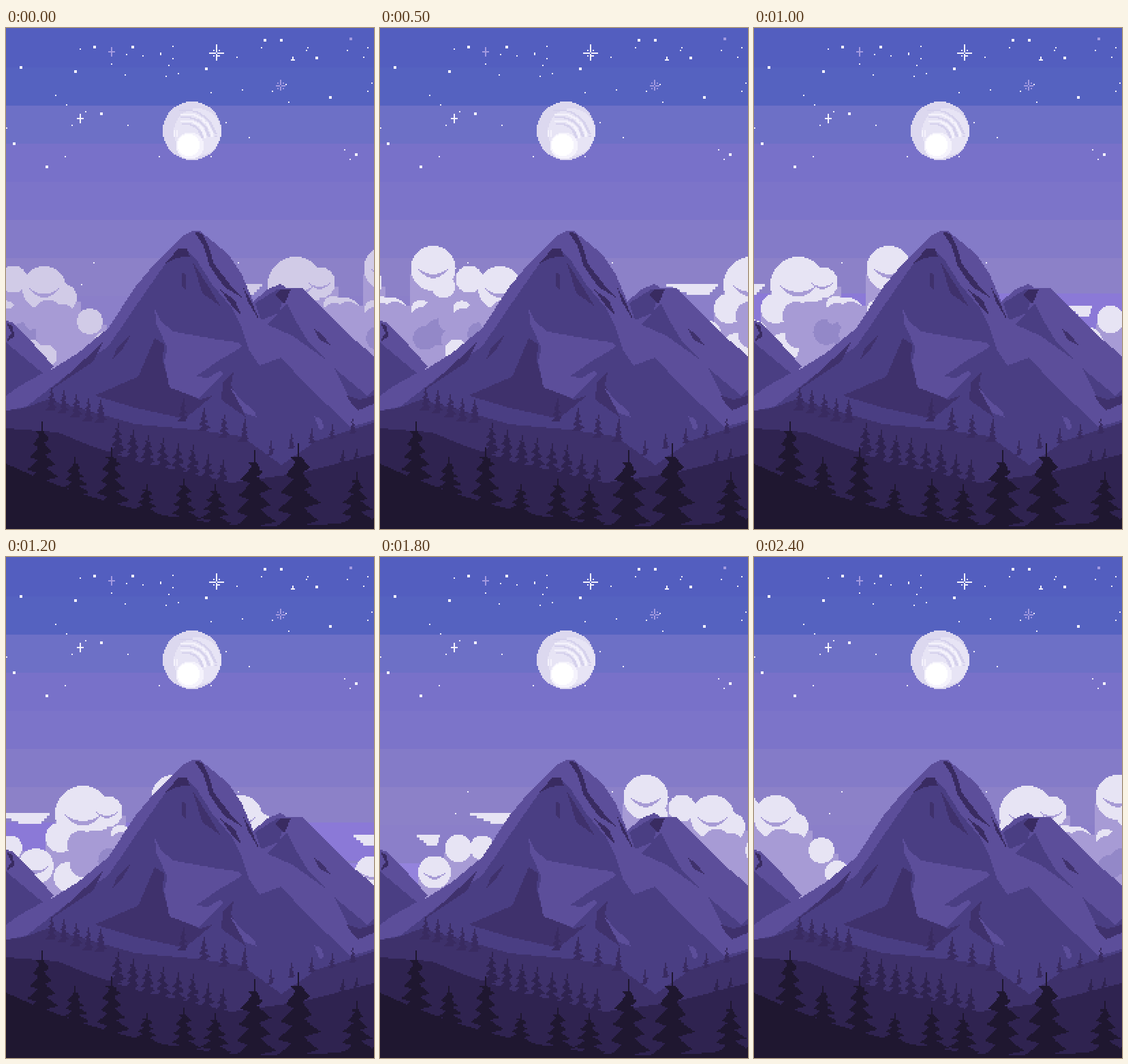
An HTML page with a canvas for the animation above (2.5 s loop, 540x736 px).

```html
<!DOCTYPE html>
<html lang="en">
<head>
<meta charset="utf-8">
<title>Night mountains</title>
<style>
html, body { margin: 0; width: 100%; height: 100%; overflow: hidden; background: #1f1730; }
canvas { display: block; width: 540px; height: 736px; image-rendering: pixelated; }
</style>
</head>
<body>
<canvas id="stage" width="270" height="368"></canvas>
<script>
// Coordinates are stage pixels; one art pixel covers 2 x 2 of them.
const W = 270, H = 368, STEP = 100, STEPS = 25, SPEED = 24, SPAN = 600;
const stage = document.getElementById('stage').getContext('2d');
let ctx = stage;

const rand = n => { const v = Math.sin(n * 12.9898) * 43758.5453; return v - Math.floor(v); };
const parse = text => text.trim().split(/\s+/).map(p => p.split(',').map(Number));
const each = (text, fn) => parse(text).forEach(p => fn(...p));
const loop = (n, fn) => { for (let i = 0; i < n; i++) fn(i); };

function layer(paint) {
  const canvas = document.createElement('canvas');
  canvas.width = W;
  canvas.height = H;
  ctx = canvas.getContext('2d');
  paint();
  ctx = stage;
  return canvas;
}

function rect(color, x, y, w, h) {
  ctx.fillStyle = color;
  ctx.fillRect(Math.floor(x / 2), Math.floor(y / 2), Math.max(1, Math.round(w / 2)), Math.max(1, Math.round(h / 2)));
}

// Hard-edged scanline fill
function fill(color, points) {
  const pts = points.map(([x, y]) => [x / 2, y / 2]);
  const ys = pts.map(p => p[1]);
  ctx.fillStyle = color;
  for (let y = Math.floor(Math.min(...ys)); y < Math.max(...ys); y++) {
    const mid = y + 0.5, cuts = [];
    pts.forEach(([x1, y1], i) => {
      const [x2, y2] = pts[(i + 1) % pts.length];
      if ((y1 <= mid) !== (y2 <= mid)) cuts.push(x1 + (mid - y1) / (y2 - y1) * (x2 - x1));
    });
    cuts.sort((a, b) => a - b);
    for (let i = 0; i + 1 < cuts.length; i += 2) {
      const a = Math.round(cuts[i]);
      ctx.fillRect(a, y, Math.round(cuts[i + 1]) - a, 1);
    }
  }
}

const poly = (color, text) => fill(color, parse(text));
const ridge = (color, text) => poly(color, text + ' 540,736 0,736');

function disk(color, x, y, r) {
  const ring = [];
  loop(36, i => ring.push([x + r * Math.cos(i * Math.PI / 18), y + r * Math.sin(i * Math.PI / 18)]));
  fill(color, ring);
}

// ---- Sky ----
const STAR = '#f4f2fd', LILAC = '#a39ae0';

function cross(color, x, y, r, below = r) {
  rect(color, x - r, y, r * 2 + 2, 2);
  rect(color, x, y - r - 2, 2, r + below + 4);
}

function sparkle(color, x, y, r) {
  cross(color, x, y, r);
  loop(4, i => rect(color, x + (i % 2 ? 4 : -4), y + (i < 2 ? 4 : -4), 2, 2));
  rect('#5662c0', x, y, 2, 2);
}

function moon(x, y, r) {
  disk('#dcd8ef', x, y, r);
  disk('#e7e4f5', x + 8, y + 2, r - 8);
  // Curved streaks around the bright basin
  loop(5, i => loop(30, j => {
    const a = -1.75 + j * 0.055, d = 24 + i * 5;
    rect(i % 2 ? '#f5f3fc' : '#d5d1ec', x - 10 + d * Math.cos(a), y + 14 + d * Math.sin(a), 4, 2);
  }));
  loop(2, i => rect('#f5f3fc', x - 27 + i * 4, y, 2, 10));
  disk('#f5f3fc', x - 3, y + 22, 20);
  disk('#ffffff', x - 5, y + 21, 16);
}

const sky = layer(() => {
  const bands = ['#535ebf', '#5562c0', '#6d70c6', '#7871c9', '#7c74c9', '#847bc8', '#8c81c8', '#8b7fc9', '#9483dd'];
  bands.forEach((c, i) => rect(c, 0, i * 56 + (i ? 2 : 0), 540, 736));
  loop(42, i => rect('#f0eefb', rand(i + 3) * 540, 26 + 180 * rand(i + 71) ** 1.4, 2, 2));
  each('22,58 102,64 130,28 186,28 294,60 380,18 404,18 456,44 476,102 140,126 60,204 12,170 514,186',
    (x, y) => rect(STAR, x - 2, y - 2, 4, 4));
  each('129,345 341,345 111,376', (x, y) => rect(STAR, x, y, 2, 2));
  rect(LILAC, 504, 14, 4, 4);
  cross(LILAC, 154, 34, 4, 6);
  cross(STAR, 108, 132, 4, 6);
  cross(STAR, 420, 46, 2, 0);
  sparkle(STAR, 308, 36, 10);
  sparkle(LILAC, 402, 84, 6);
  moon(273, 151, 43);
});

// ---- Clouds ----
const MID = '#a79bd5', DEEP = '#9388c8';
const BILLOWS = parse(`248,463,24 283,428,20 318,427,18 356,454,26 392,412,22 404,470,22 425,377,41 460,374,23
  497,420,24 558,353,33 573,380,17 611,369,20 656,382,32 684,396,20 723,431,19 746,464,18`);

function fold(x, y, r) {
  const top = [], low = [];
  loop(13, i => {
    const t = i / 6 - 1, bend = 1 - t * t;
    top.push([x + t * r, y + bend * r * 0.38]);
    low.unshift([x + t * r, y + bend * r * 0.62]);
  });
  fill(MID, [...top, ...low]);
}

function clouds(dx, light) {
  BILLOWS.forEach(([x, y, r]) => rect(MID, x - r + dx, y + r * 0.3, r * 2 + 6, 520 - y));
  loop(4, i => rect(light, 300 + i * 10 + dx, 376 + i * 4, 76 - i * 14, 4));
  loop(4, i => rect(light, 222 + i * 5 + dx, 408 + i * 4, 34 - i * 6, 4));
  BILLOWS.forEach(([x, y, r]) => disk(light, x + dx, y, r));
  // Shaded folds below the bright crowns
  loop(14, i => {
    const x = 420 + i * 20 + dx, y = 416 + 14 * rand(i + 5), r = 15 + 9 * rand(i + 40);
    if (i % 3 === 0) disk(light, x, y - 14, r * 0.8);
    disk(MID, x + 2, y, r);
    disk(i % 4 > 1 ? DEEP : MID, x + 6, y + 28, r);
  });
  loop(4, i => disk(light, 592 + i * 22 + dx, 474 + 8 * (i % 2), 17));
  BILLOWS.filter(b => b[2] > 22).forEach(([x, y, r]) => fold(x + dx, y, r * 0.7));
}

// ---- Land ----
const LIT = '#5c4e9a', SLOPE = '#4a3e83', SHADE = '#3f316c', CLEFT = '#392b61', FOOT = '#3e316b', WOOD = '#2f2350', FRONT = '#1f1730';

function peaks() {
  // Left hill
  poly(LIT, '0,430 12,434 32,455 70,497 56,512 0,550');
  poly(SLOPE, '0,462 24,482 54,507 20,526 0,540');
  poly(CLEFT, '0,433 10,438 12,454 0,461 8,448');

  // Right peak
  poly(LIT, '350,412 384,384 402,376 412,382 434,381 462,410 500,448 540,482 540,600 380,600');
  poly(SLOPE, '366,404 398,384 412,386 400,418 374,430');
  poly(CLEFT, '394,392 404,384 418,384 408,406');
  poly(SLOPE, '412,404 424,428 444,462 476,492 420,452 384,436');
  poly(SHADE, '452,442 464,450 476,466 460,458');
  poly(SLOPE, '482,500 530,540 540,530 540,560 515,566');
  poly(SHADE, '500,540 518,546 540,540 540,556 514,564');

  // Main peak
  poly(LIT, `0,540 20,536 60,506 105,478 150,441 190,380 220,344 262,304 274,298 284,298 326,332 346,362 374,428
    420,468 480,525 516,562 540,552 540,640 0,640`);
  poly(SLOPE, `262,324 278,338 302,376 332,412 346,440 357,474 372,496 404,484 440,524 506,586 540,576 540,660 0,660
    0,562 30,556 92,508 150,468 184,418 224,360 240,338`);
  poly(CLEFT, '276,299 288,302 298,322 305,346 328,376 346,396 320,380 299,350 290,320');
  poly(CLEFT, '234,346 252,325 266,325 269,335 250,338');
  poly(SHADE, '258,360 264,362 264,384 257,378');
  poly(SHADE, '274,344 296,378 314,408 288,390');
  poly(CLEFT, '314,384 336,400 346,424 334,412');
  poly(CLEFT, '346,376 362,406 372,430 356,404');
  poly(SHADE, '218,456 232,464 230,488 240,526 284,546 304,540 262,574 190,558 130,540 194,512');
  poly(SHADE, '182,452 172,470 156,486 164,468');
  poly(SHADE, '142,462 92,508 62,534 128,490');
  poly(LIT, '218,411 228,432 246,446 306,457 342,462 346,468 302,496 320,508 283,544 240,528 232,490 237,470 221,436');
  poly(SLOPE, '278,512 316,486 346,470 344,486 296,514');
  poly(SHADE, '318,522 334,504 330,524 352,572 316,546');
  poly(LIT, '328,526 346,548 364,562 368,572 350,566');
  poly(LIT, '452,570 462,574 467,588 460,590');
}

// Tiers of drooping branches, offset between the two sides
function tree(color, x, top, bottom, w, tiers) {
  const h = bottom - top;
  const reach = (f, shift) => {
    const q = f * tiers + shift, tier = Math.floor(q), t = q - tier;
    const droop = t < 0.75 ? t / 0.75 : (1 - t) * 4;
    return f < 0.14 ? 1 : w * f ** 0.7 * (0.32 + 0.68 * droop) * (0.8 + 0.4 * rand(x + tier * 7 + shift));
  };
  for (let y = 0; y < h; y += 2) {
    const left = reach(y / h, 0), right = reach(y / h, 0.4);
    rect(color, x - left, top + y, left + right, 2);
  }
}

function grove(color, n, x, y, dx, dy, h) {
  loop(n, i => {
    const top = y + i * dy + 10 * (rand(i + x) - 0.5);
    tree(color, x + i * dx, top, top + h, h * 0.27, 4);
  });
}

const ground = x => 732 - 92 * (1 - x / 400) ** 2;

function woods() {
  ridge(FOOT, '0,562 28,558 60,546 120,562 190,582 276,590 346,600 404,642 456,606 540,580');
  grove(CLEFT, 5, 68, 530, 18, 5, 34);
  grove(CLEFT, 4, 261, 550, 30, 7, 34);
  grove(CLEFT, 5, 390, 606, 30, -7, 22);
  ridge(WOOD, '0,588 76,594 120,612 190,636 330,668 430,654 540,626');
  grove(WOOD, 8, 165, 582, 22, 7, 46);
  grove(WOOD, 2, 495, 622, 20, -8, 30);

  const line = [[540, 736], [0, 736]];
  for (let x = 0; x <= 540; x += 20) line.push([x, ground(x)]);
  fill(FRONT, line);
  each('53,578 102,630 156,617 207,670 262,662 308,670 365,620 430,610 515,652',
    (x, top) => tree(FRONT, x, top, ground(x) + 8, 10 + (ground(x) + 8 - top) * 0.21, 5));
}

const land = layer(() => { peaks(); woods(); });

// ---- Playback ----
let shown = -1;
function draw() {
  const step = Math.floor(performance.now() / STEP) % STEPS;
  if (step !== shown) {
    shown = step;
    stage.drawImage(sky, 0, 0);
    if (step >= 10 && step < 18) rect('#8b79d7', 0, 390, 540, 56);
    loop(3, n => clouds(step * SPEED - n * SPAN, step ? '#e7e4f4' : '#d1cbe7'));
    stage.drawImage(land, 0, 0);
  }
  requestAnimationFrame(draw);
}
draw();
</script>
</body>
</html>
```
